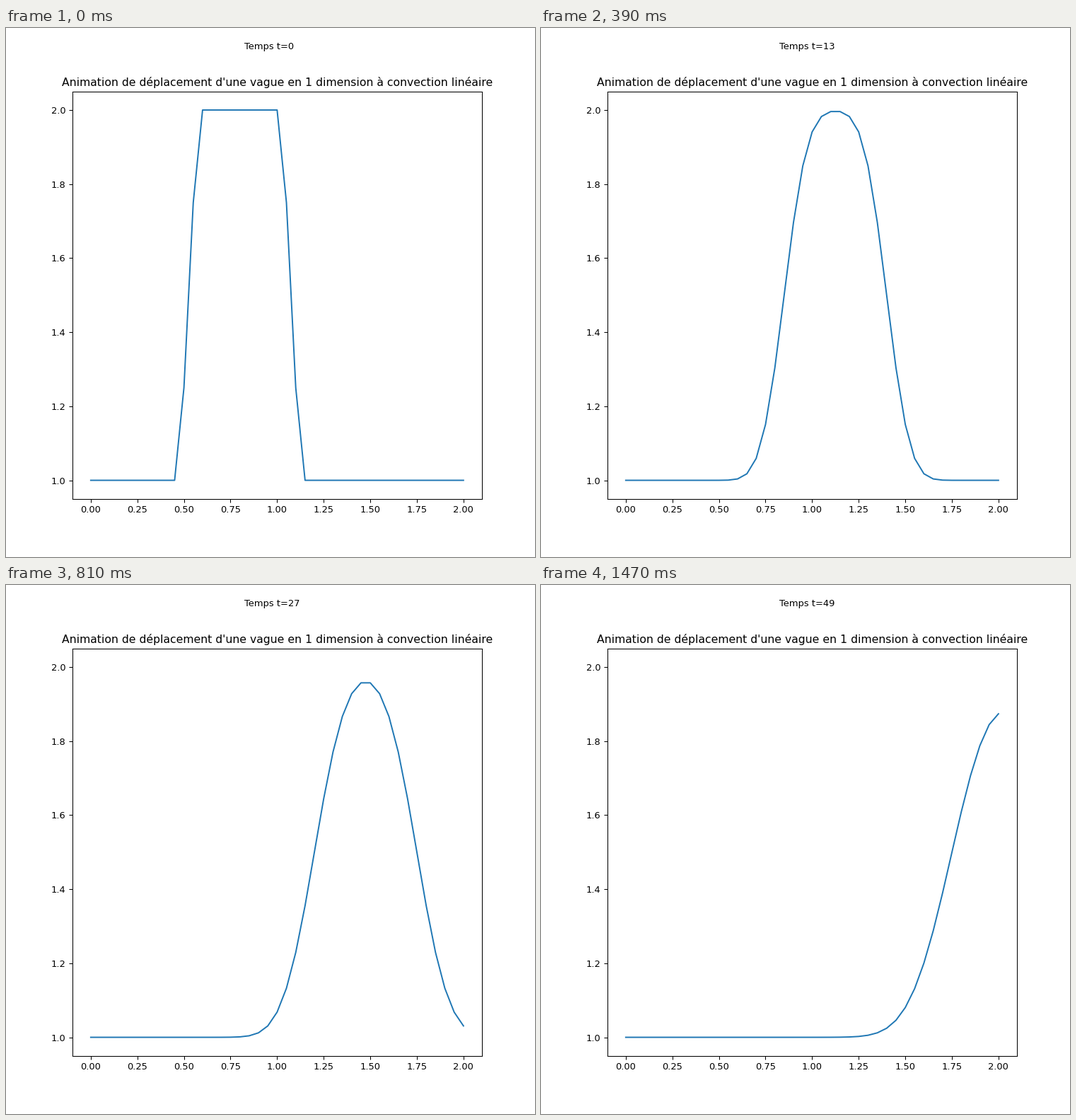
Write a matplotlib script that moves like this. It is 748 px wide and 748 px high and loops after 1500 ms.

```python
import numpy as np
import matplotlib.pyplot as plt
from matplotlib.animation import FuncAnimation

FRAMES = 50
INTERVAL = 30
POINTS = 41
COURANT = 0.5
WARMUP = 2  # steps already taken when the first frame is shown


def solve():
    """Upwind scheme for linear convection of a square pulse."""
    u = np.ones(POINTS)
    u[10:21] = 2
    states = [u]
    for _ in range(WARMUP + FRAMES - 1):
        nxt = u.copy()
        nxt[1:] -= COURANT * (u[1:] - u[:-1])
        states.append(nxt)
        u = nxt
    return states[WARMUP:]


plt.rcParams["font.family"] = "DejaVu Sans"
x = np.linspace(0, 2, POINTS)
waves = solve()

# 8 in x 93.5 dpi = 748 px
fig, ax = plt.subplots(figsize=(8, 8), dpi=93.5)
ax.set_title("Animation de déplacement d'une vague en 1 dimension à convection linéaire")
ax.set_xlim(-0.1, 2.1)
ax.set_ylim(0.95, 2.05)
line, = ax.plot(x, waves[0], color="#1f77b4", lw=1.5)
clock = fig.text(0.45, 0.96, "Temps t=0", fontsize=10)


def update(t):
    line.set_ydata(waves[t])
    clock.set_text(f"Temps t={t}")
    return line, clock


anim = FuncAnimation(fig, update, frames=FRAMES, interval=INTERVAL,
                     repeat=True, repeat_delay=0, blit=False)
plt.show()
```
